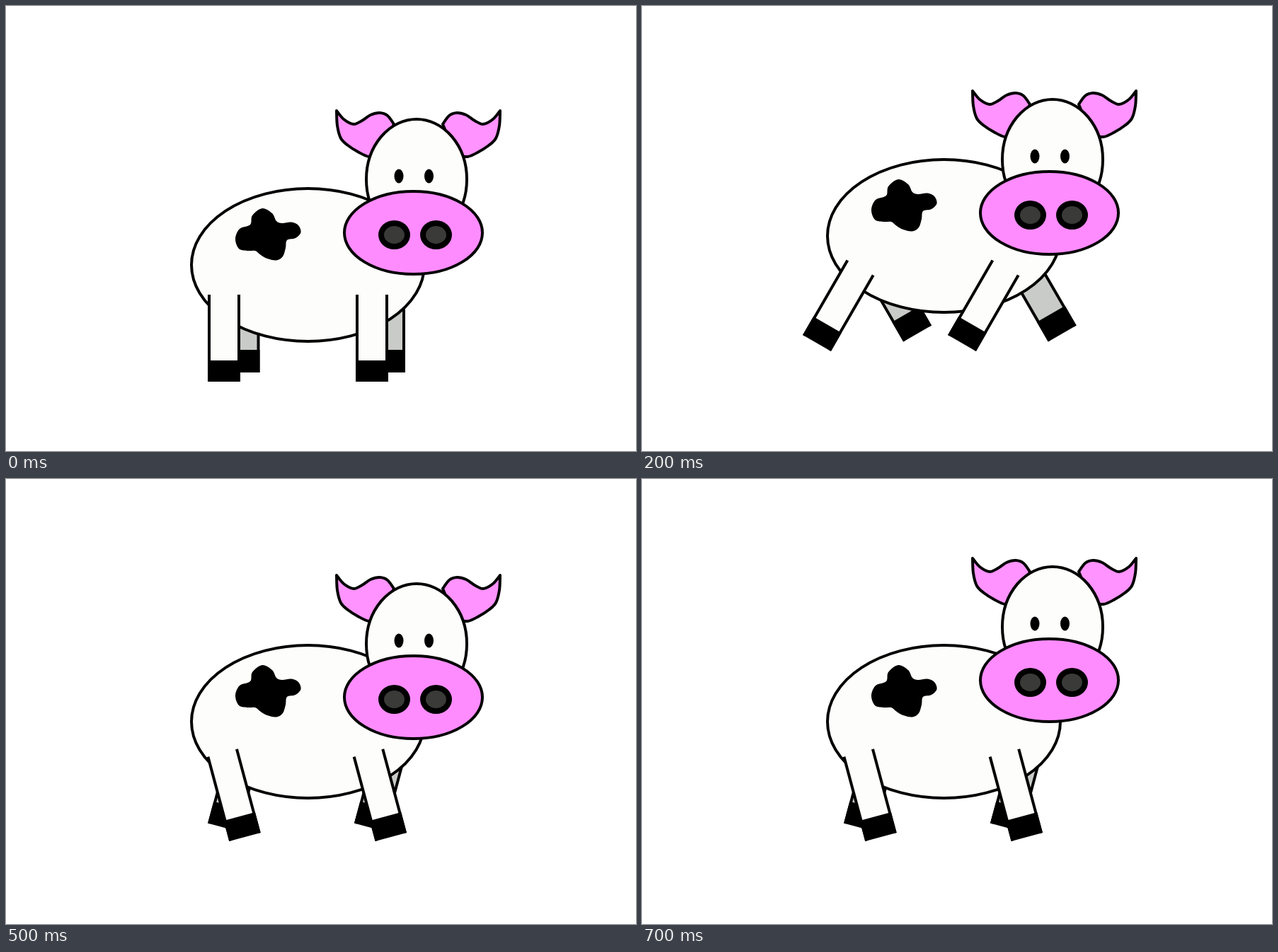
These frames come from a looping animation (890x629 px, 800 ms). An HTML page with a canvas:

```html
<!DOCTYPE html>
<html lang="en">
<head>
<meta charset="utf-8">
<title>Trotting cow</title>
<style>
html, body { margin: 0; width: 100%; height: 100%; overflow: hidden; background: #fff; }
canvas { display: block; }
</style>
</head>
<body>
<canvas id="stage" width="890" height="629"></canvas>
<script>
const ctx = document.getElementById('stage').getContext('2d');
const STEP = 100;
const HIDE = '#fdfdfb', SHADE = '#c9cbc8', PINK = '#ff8cff', EAR = '#ff93ff', INK = '#000';

// Leg angle in degrees, body and head lift, feet as [x, x, y].
const stand = { angle: 0, body: 0, head: 0, front: [308, 517, 531], back: [335.5, 541, 518] };
const back15 = { angle: 15, body: -23, front: [276.5, 481.7, 506], back: [363.3, 568, 492] };
const back30 = { angle: 30, body: -41, front: [247, 452, 476.5], back: [389.1, 593.7, 463] };
const fore15 = { angle: -15, body: -23, front: [337.5, 543.8, 506], back: [307.3, 514.2, 492.5] };
const fore30 = { angle: -30, body: -41, front: [365.5, 573, 476.5], back: [281.5, 488.5, 463] };
const low = -12, mid = -28, high = -36;
const stride = [
  stand, { ...back15, head: low }, { ...back30, head: mid }, { ...back15, head: high },
  stand, { ...fore15, head: low }, { ...fore30, head: mid }, { ...fore15, head: high }
];

const patch = [[362, 286], [348, 296], [345, 309], [330, 315], [324, 329], [329, 343], [341, 346],
  [352, 346], [360, 352], [369, 357], [382, 359.5], [391, 354], [395, 342], [397, 331],
  [409, 328], [416.5, 320], [413, 310], [403, 305.5], [390, 307], [382, 304], [376, 293]];
const earTop = [[467, 148], [477, 160], [491, 167], [503, 162], [515, 154], [528, 151], [539, 155], [548, 167]];
const earBase = [[530, 210], [513, 213], [497, 206], [483, 197], [473, 187], [468, 169], [467, 148]];

function ellipse(x, y, rx, ry, fill, outlined) {
  ctx.beginPath();
  ctx.ellipse(x, y, rx, ry, 0, 0, Math.PI * 2);
  ctx.fillStyle = fill;
  ctx.fill();
  if (outlined) ctx.stroke();
}

// Adds a smooth curve through the points to the current path.
function curve(pts, closed) {
  const n = pts.length;
  const at = i => closed ? pts[(i + n) % n] : pts[Math.max(0, Math.min(n - 1, i))];
  ctx.lineTo(...pts[0]);
  for (let i = 0; i < (closed ? n : n - 1); i++) {
    const [a, b, c, d] = [at(i - 1), at(i), at(i + 1), at(i + 2)];
    ctx.bezierCurveTo(
      b[0] + (c[0] - a[0]) / 6, b[1] + (c[1] - a[1]) / 6,
      c[0] - (d[0] - b[0]) / 6, c[1] - (d[1] - b[1]) / 6, c[0], c[1]);
  }
}

function leg(x, y, angle, length, hoof, fill) {
  ctx.save();
  ctx.translate(x, y);
  ctx.rotate(angle * Math.PI / 180);
  ctx.fillStyle = fill;
  ctx.fillRect(-21, -length, 42, length);
  ctx.fillStyle = INK;
  ctx.fillRect(-23, -length, 4, length);
  ctx.fillRect(19, -length, 4, length);
  ctx.fillRect(-23, -hoof, 46, hoof);
  ctx.restore();
}

function legs([x1, x2, y], angle, length, hoof, fill) {
  leg(x1, y, angle, length, hoof, fill);
  leg(x2, y, angle, length, hoof, fill);
}

function body(dy) {
  ctx.save();
  ctx.translate(0, dy);
  ellipse(426.5, 366, 164.5, 108, HIDE, true);
  ctx.beginPath();
  curve(patch, true);
  ctx.fillStyle = INK;
  ctx.fill();
  ctx.restore();
}

function ear() {
  ctx.beginPath();
  curve(earTop);
  curve(earBase);
  ctx.closePath();
  ctx.fillStyle = EAR;
  ctx.fill();
  ctx.stroke();
}

function head(dy) {
  ctx.save();
  ctx.translate(0, dy);
  ear();
  ctx.save();
  ctx.translate(1165, 0);
  ctx.scale(-1, 1);
  ear();
  ctx.restore();
  ellipse(580, 245, 71, 85, HIDE, true);
  for (const x of [555, 597.5]) ellipse(x, 240.5, 6.5, 10, INK);
  ellipse(575.5, 320.5, 97.5, 58.5, PINK, true);
  for (const x of [548.5, 607.5]) {
    ellipse(x, 323.5, 22.5, 20.5, INK);
    ellipse(x, 323.5, 14.5, 12.5, '#3a3a38');
  }
  ctx.restore();
}

function draw(now) {
  const pose = stride[Math.floor(now / STEP) % stride.length];
  ctx.fillStyle = '#fff';
  ctx.fillRect(0, 0, 890, 629);
  ctx.strokeStyle = INK;
  ctx.lineWidth = 4;
  ctx.lineJoin = 'round';
  legs(pose.back, -pose.angle, 100, 32, SHADE);
  body(pose.body);
  legs(pose.front, pose.angle, 123, 30, HIDE);
  head(pose.head);
}

const start = performance.now();
function tick() {
  draw(performance.now() - start);
  requestAnimationFrame(tick);
}
tick();
</script>
</body>
</html>
```
